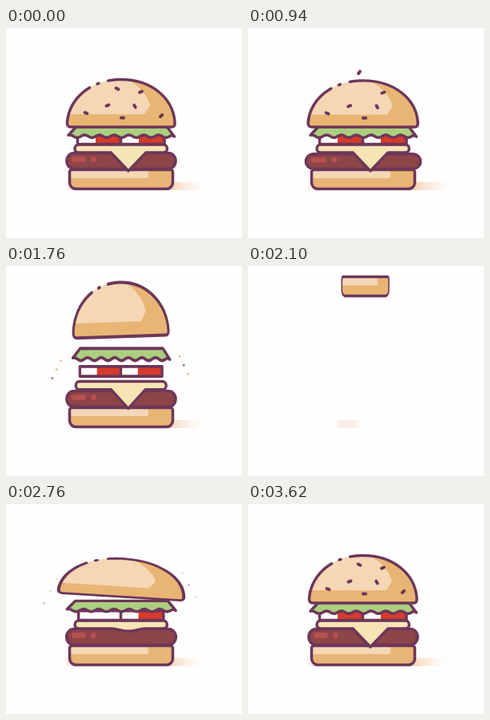
An HTML page with a canvas that plays this animation: 295 by 263 pixels, repeating every 3640 ms.

```html
<!DOCTYPE html>
<html lang="en">
<head>
<meta charset="utf-8">
<title>Burger</title>
<style>
html, body { margin: 0; width: 100%; height: 100%; overflow: hidden; background: #fefefe; }
canvas { display: block; width: 295px; height: 263px; }
</style>
</head>
<body>
<canvas id="stage"></canvas>
<script>
const LOOP = 3640, W = 295, H = 263, MID = 144;
const JUMP = 340, LAND = 790, LEAVE = 1680, REBUILD = 2080;
const INK = '#6d3759', BREAD = '#e9b574', LIGHT = '#f5d7b6', MEAT = '#8e4548',
      SHINE = '#b65050', CHEESE = '#f7e4b5', LEAF = '#abcf7f', RED = '#d63b2b';
const canvas = document.getElementById('stage');
const ctx = canvas.getContext('2d');
const ratio = window.devicePixelRatio || 1;
canvas.width = W * ratio;
canvas.height = H * ratio;

// Easing rules
const part = (t, from, to) => Math.max(0, Math.min(1, (t - from) / (to - from)));
const pulse = (t, from, to) => Math.sin(Math.PI * part(t, from, to));
const hop = (t, from, to) => 4 * part(t, from, to) * (1 - part(t, from, to));
const smooth = p => p * p * (3 - 2 * p);
const ring = q => q > 0 ? Math.exp(-q / 110) * Math.sin(q / 55) : 0;
const radians = deg => deg * Math.PI / 180;

// Seeds in landing order: x, y, tilt
const seeds = [
  [161, 98, 60], [168.5, 80, -20], [100, 106.5, 22], [127, 97, -20],
  [145.5, 112.5, 0], [139, 76, 30], [194, 110, -45]
];

function paint(fill, stroke = INK) {
  if (fill) { ctx.fillStyle = fill; ctx.fill(); }
  if (stroke) { ctx.strokeStyle = stroke; ctx.stroke(); }
}

function box(x, y, w, h, r, fill, stroke) {
  ctx.beginPath();
  ctx.roundRect(x, y, w, h, r);
  paint(fill, stroke);
}

function drawShadow(t) {
  const rebuilt = t > REBUILD;
  const p = rebuilt ? part(t, REBUILD + 5, 2235) : 1 - part(t, LEAVE, 1980);
  const size = 1 - (1 - p) ** 2;
  if (size < .02) return;
  const end = 254 + .0047 * (rebuilt ? t - LOOP : t);
  const left = 121 - 46 * size, right = 121 + (end - 121) * size;
  const fade = ctx.createLinearGradient(left, 0, right, 0);
  fade.addColorStop(0, '#fdf1ec');
  fade.addColorStop(.74, `rgba(247, 212, 184, ${size})`);
  fade.addColorStop(1, 'rgba(254, 246, 240, 0)');
  ctx.fillStyle = fade;
  ctx.fillRect(left, 193, right - left, 10);
}

function drawBase() {
  const corners = [3, 3, 8, 8];
  box(79.5, 177.5, 129, 24, corners, BREAD, null);
  box(81, 179, 97, 9, [2, 0, 2, 0], LIGHT, null);
  box(79.5, 177.5, 129, 24, corners, null);
}

function drawPatty() {
  box(76, 156.5, 136, 20, 9.5, MEAT);
  box(82, 161, 18, 7, 3.5, SHINE, null);
  box(106, 161, 7, 7, 3.5, SHINE, null);
}

// The slice hangs down as a soft bulge that sharpens into a corner.
function drawCheese(t) {
  const hang = t < REBUILD ? 1 : smooth(part(t, 2720, 2890));
  const tip = 156 + 23 * hang, soft = 11 * (1 - hang);
  ctx.beginPath();
  ctx.moveTo(131, 156);
  ctx.lineTo(91, 156);
  ctx.arc(91, 151, 5, Math.PI / 2, Math.PI * 1.5);
  ctx.lineTo(196.5, 146);
  ctx.arc(196.5, 151, 5, -Math.PI / 2, Math.PI / 2);
  ctx.lineTo(175, 156);
  ctx.bezierCurveTo(175 - soft, 156, 153 + soft, tip, 153, tip);
  ctx.bezierCurveTo(153 - soft, tip, 131 + soft, 156, 131, 156);
  paint(CHEESE);
}

function drawTomato(t) {
  const grow = t < REBUILD ? 1 : part(t, 2770, 2870);
  box(89.5, 134, 108.5, 11.5, 0, '#fff', null);
  ctx.fillStyle = RED;
  ctx.fillRect(143 - 31 * grow, 134, 31 * grow, 11.5);
  ctx.fillRect(166, 134, 32, 11.5);
  box(89.5, 134, 108.5, 11.5, 0, null);
  box(143.5, 134, 0, 11.5, 0, null);
}

function drawLeaf() {
  ctx.beginPath();
  ctx.moveTo(88, 123.5);
  ctx.lineTo(201, 123.5);
  ctx.lineTo(210.5, 136);
  for (let x = 207; x >= 78; x -= 1.5)
    ctx.lineTo(x, 135.6 + 1.7 * Math.cos((x - 89) * Math.PI * 2 / 18.5));
  ctx.closePath();
  paint(LEAF);
}

function drawSeed(x, y, tilt) {
  ctx.save();
  ctx.translate(x, y);
  ctx.rotate(radians(tilt));
  ctx.lineWidth = 3.9;
  ctx.beginPath();
  ctx.moveTo(-1.6, 0);
  ctx.lineTo(1.6, 0);
  paint(null);
  ctx.restore();
}

function domePoint(u) {
  const v = 1 - u;
  const mix = (a, b, c, d) => v ** 3 * a + 3 * v * v * u * b + 3 * v * u * u * c + u ** 3 * d;
  return [mix(76.5, 79, 106, MID), mix(118, 88, 64.5, 64.5)];
}

function domeLine(from, to) {
  for (let i = 0; i <= 20; i++) ctx.lineTo(...domePoint(from + (to - from) * i / 20));
}

function rightSideAndBottom() {
  ctx.bezierCurveTo(182, 64.5, 209, 88, 211, 118);
  ctx.quadraticCurveTo(211.5, 124, 207, 124);
  ctx.lineTo(81, 124);
  ctx.quadraticCurveTo(76, 124, 76.5, 118);
}

function drawBun(t) {
  ctx.beginPath();
  domeLine(0, 1);
  rightSideAndBottom();
  paint(BREAD, null);

  ctx.save();
  ctx.clip();
  ctx.beginPath();
  ctx.moveTo(70, 108);
  ctx.lineTo(173, 108);
  ctx.lineTo(180, 97);
  ctx.quadraticCurveTo(174, 76, 151, 64);
  ctx.lineTo(70, 60);
  paint(LIGHT, null);
  ctx.restore();

  // Broken outline on the upper left
  ctx.beginPath();
  domeLine(.85, 1);
  rightSideAndBottom();
  domeLine(0, .6);
  paint(null);
  ctx.beginPath();
  domeLine(.71, .73);
  paint(null);

  seeds.forEach((seed, i) => { if (!seedLift(t, i)) drawSeed(...seed); });
}

// Each seed is tossed up, lands in turn, and rains down again after the rebuild.
function seedLift(t, i) {
  const first = 820 + .2256 * i ** 4, second = 3080 + 65 * i;
  if (t < LEAVE) return (90 + 80 * Math.sqrt(i / 6)) * hop(t, JUMP, first);
  const fall = part(t, second - 250, second);
  return t < REBUILD ? 600 * part(t, LEAVE, LEAVE + 250) : 170 * (1 - fall * fall);
}

const layers = [
  { draw: drawBase, base: 201.5 }, { draw: drawPatty, base: 176.5 },
  { draw: drawCheese, base: 156 }, { draw: drawTomato, base: 145.5 },
  { draw: drawLeaf, base: 136 }, { draw: drawBun, base: 124 }
];
const PATTY = 1, LETTUCE = 4, BUN = 5;

function poseAt(t, i) {
  const leave = LEAVE + 22 * (BUN - i), land = 2235 + 95 * i;
  const away = part(t, leave, leave + 210), drop = part(t, land - 150, land);
  const crouch = pulse(t, 1320, LEAVE);
  const settle = t > REBUILD ? 1 - part(t, 2760, 2850) : 0;
  const pose = { lift: Math.max(0, i - 1) * .9 * crouch, squash: 0, tilt: 0, shown: true };

  if (i === BUN) {
    pose.lift += 75 * hop(t, JUMP, LAND) + 8 * settle;
    pose.squash = .1 * pulse(t, 40, JUMP) - .11 * pulse(t, JUMP, LAND)
      + .2 * ring(t - LAND) + .11 * crouch;
    pose.tilt = 3.6 * settle - 2.7 * pulse(t, JUMP, LAND) - 5 * (t < REBUILD ? away : 0);
  }
  if (i === LETTUCE) pose.lift += 10.5 * hop(t, JUMP, LAND) + 2.5 * settle;
  if (i === PATTY) pose.squash = .1 * ring(t - LAND - 90);

  if (t < REBUILD) {
    pose.lift += 240 * away * away;
    pose.squash -= .3 * away;
    pose.shown = away < 1;
  } else {
    pose.lift += 166 * (1 - drop * drop);
    pose.squash = (i === BUN ? .33 : .2) * ring(t - land);
    pose.shown = drop > 0;
  }
  pose.narrow = t < REBUILD ? 1 : .39 + .61 * drop;
  pose.shift = t < REBUILD ? 0 : 3 * (1 - drop);
  return pose;
}

function drawLayer(t, { draw, base }, i) {
  const pose = poseAt(t, i);
  if (!pose.shown) return;
  ctx.save();
  ctx.translate(MID + pose.shift, base - pose.lift);
  ctx.rotate(radians(pose.tilt));
  ctx.scale((1 + pose.squash) * pose.narrow, 1 - 1.2 * pose.squash);
  ctx.translate(-MID, -base);
  draw(t);
  ctx.restore();
}

function drawCrumbs(t, start, life, y, reach) {
  const p = part(t, start, start + life);
  if (p === 0 || p === 1) return;
  for (let i = 0; i < 6; i++) {
    const side = i % 2 ? 1 : -1, far = 1 - .13 * i;
    ctx.beginPath();
    ctx.arc(MID + side * (66 + reach * p * far), y - 30 * p * (1 - p) * i + 8 * p * p,
      1.7 * (1 - p), 0, Math.PI * 2);
    paint([SHINE, BREAD, LEAF][i % 3], null);
  }
}

function render(t) {
  ctx.setTransform(ratio, 0, 0, ratio, 0, 0);
  ctx.fillStyle = '#fefefe';
  ctx.fillRect(0, 0, W, H);
  ctx.lineWidth = 3.5;
  ctx.lineCap = ctx.lineJoin = 'round';

  drawShadow(t);
  layers.forEach((layer, i) => drawLayer(t, layer, i));
  seeds.forEach(([x, y, tilt], i) => {
    const lift = seedLift(t, i);
    if (lift) drawSeed(x, y - lift, tilt - 4 * lift);
  });
  drawCrumbs(t, LEAVE + 10, 300, 140, 85);
  drawCrumbs(t, 2640, 240, 122, 60);
}

function tick(now) {
  render(now % LOOP);
  requestAnimationFrame(tick);
}
render(0);
requestAnimationFrame(tick);
</script>
</body>
</html>
```
